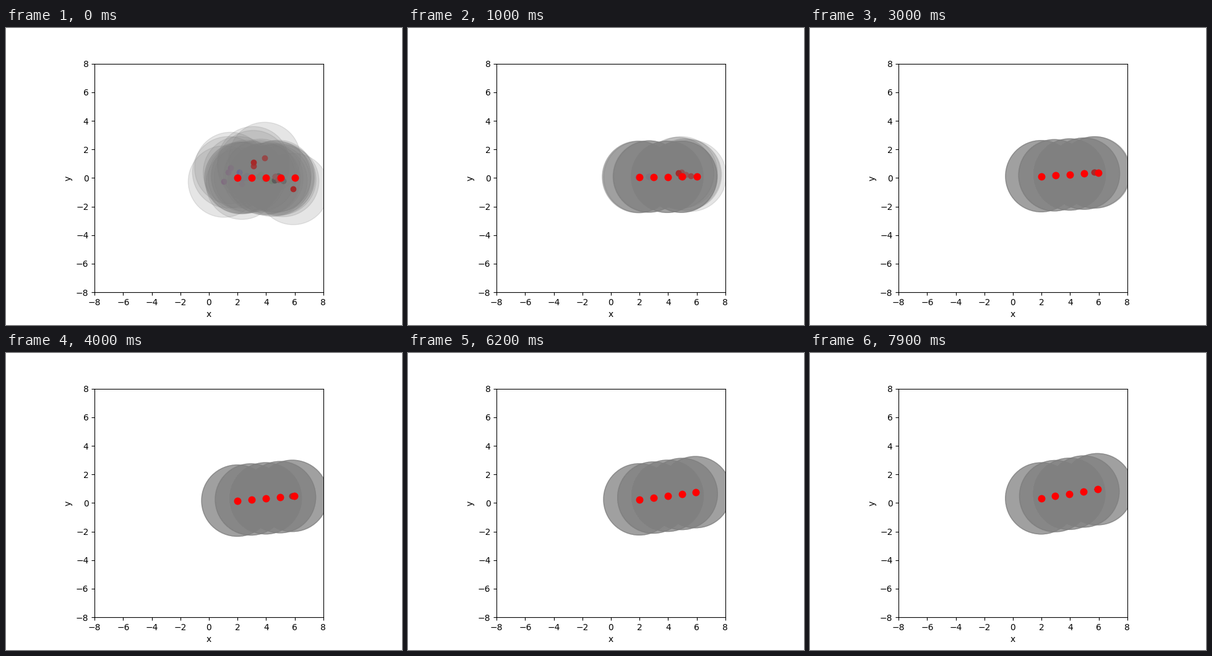
These frames come from a looping animation (640x480 px, 8000 ms). A matplotlib script:

```python
import numpy as np
import matplotlib.pyplot as plt
from matplotlib.animation import FuncAnimation
from matplotlib.patches import Circle

FRAMES, INTERVAL = 80, 100
TURN = 0.00204                       # target rotation per step, in radians
RANGE = 2.5                          # sensing radius
TEAM_SIZE = 6
DRIFT = np.array([0.94, 0.91])       # decay of a team's distance to its target
SQUEEZE = np.array([1.0, 0.9])       # spread decays faster vertically

rng = np.random.default_rng(4)


def target(radius, step):
    a = TURN * step
    return radius * np.array([np.cos(a), np.sin(a)])


class Team:
    """Robots whose centre closes in on a target while their spread shrinks."""

    def __init__(self, radius, color, base, scouts, spread_rate=0.77):
        self.radius, self.color = radius, color
        crowd = rng.normal((base, 0), (0.25, 0.1),
                           (TEAM_SIZE - len(scouts), 2))
        start = np.vstack([crowd, *scouts])
        mean = start.mean(axis=0)
        self.gap = mean - target(radius, 0)
        self.spread = start - mean
        self.spread_rate = spread_rate * SQUEEZE

    def positions(self, step):
        return (target(self.radius, step) + self.gap * DRIFT ** step
                + self.spread * self.spread_rate ** step)

    def add_to(self, ax, layer):
        self.parts = []
        for z in layer + 0.1 * np.arange(TEAM_SIZE) / TEAM_SIZE:
            disc = ax.add_patch(Circle((0, 0), RANGE, color="gray", alpha=0.2,
                                       zorder=z))
            dot, = ax.plot([], [], "o", color=self.color, zorder=z + 0.005)
            self.parts.append((disc, dot))

    def move(self, step):
        for (disc, dot), (x, y) in zip(self.parts, self.positions(step)):
            disc.center = x, y
            dot.set_data([x], [y])


teams = [
    Team(2, "purple", 2.45, [(2.3, -0.4), (1.05, -0.25),
                             (1.35, 0.4), (1.5, 0.7)]),
    Team(3, "blue", 2.6, [(2.1, 0.4)]),
    Team(4, "green", 4.0, []),
    Team(5, "black", 5.0, [(4.85, 0.15), (4.6, -0.17)]),
    Team(6, "brown", 4.6, [(3.9, 1.4), (5.9, -0.77),
                           (3.1, 0.83), (3.1, 1.1)], spread_rate=0.89),
]

fig, ax = plt.subplots(figsize=(6.4, 4.8), dpi=100)
ax.set_aspect("equal")
ax.set(xlim=(-8, 8), ylim=(-8, 8), xlabel="x", ylabel="y")
for i, team in enumerate(teams):
    team.add_to(ax, 1 + 0.1 * i)
goals, = ax.plot([], [], "o", color="red", markersize=7.6, zorder=2)


def update(step):
    for team in teams:
        team.move(step)
    goals.set_data(*np.transpose([target(t.radius, step) for t in teams]))
    return [goals]


anim = FuncAnimation(fig, update, frames=FRAMES, interval=INTERVAL,
                     repeat=True, repeat_delay=0)
plt.show()
```
